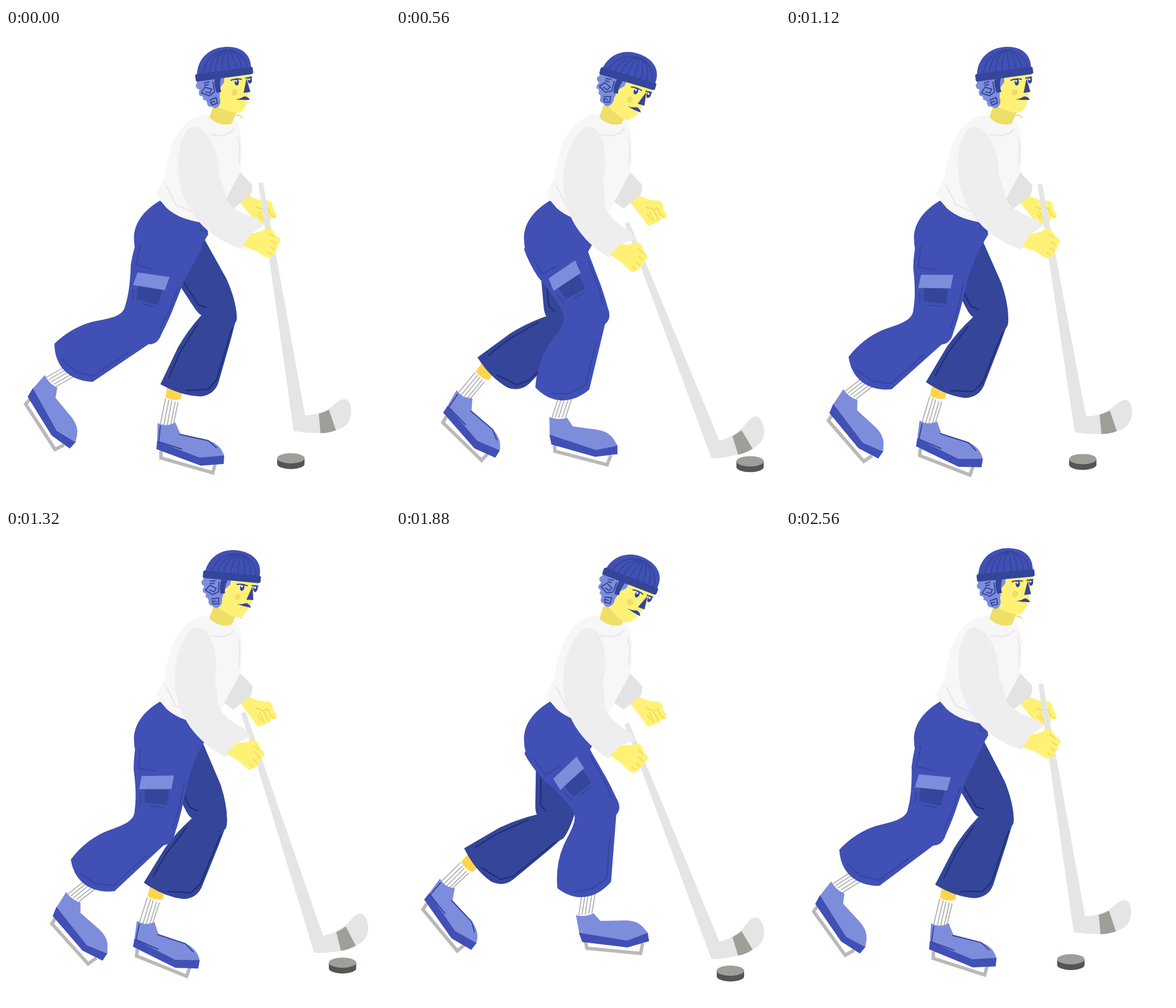
Animation, 674 px wide and 830 px high, one loop 2.6 s. Source, as an HTML page:

```html
<!DOCTYPE html>
<html lang="en">
<head>
<meta charset="utf-8">
<title>Hockey player</title>
<style>
html, body { margin: 0; width: 100%; height: 100%; overflow: hidden; background: #fff; }
svg { display: block; width: 100%; height: 100%; }
path { stroke-linejoin: round; }
.blue { fill: #4150b5; }
.navy { fill: #34459a; }
.sky { fill: #7e8ddb; }
.skin { fill: #fff176; }
.shade { fill: #eedf69; }
.amber { fill: #ffd54f; }
.shirt { fill: #f7f7f7; }
.sleeve { fill: #eee; }
.cuff { fill: #e3e3e3; }
.shaft { fill: #e5e5e5; }
.tape { fill: #9e9f99; }
.rubber { fill: #555; }
.white { fill: #fff; }
.line { fill: none; stroke-width: 2; }
.seam { stroke: #34459a; }
.deep { stroke: #1c2c6b; }
.fold { stroke: #e7e7e7; }
.knuckle { stroke: #eedc58; }
.rib { stroke: #b5b5b5; }
.blade { fill: none; stroke: #b9b9b9; stroke-width: 6; stroke-linejoin: miter; }
</style>
</head>
<body>
<svg viewBox="0 0 674 830">
  <g id="puck">
    <path class="rubber" d="M476 755V765A24 9 0 0 0 524 765V755Z"/>
    <ellipse class="tape" cx="500" cy="755" rx="24" ry="9"/>
  </g>

  <g id="farLeg">
    <path class="amber" d="M283 628L310 634L307 651Q293 655 280 648Z"/>
    <path class="white" d="M278 650L303 656L297 697L270 695Z"/>
    <path class="line rib" d="M280 650L271 695M286 652L277 697M291 654L283 697M297 656L289 697M302 657L294 695"/>
    <path class="blade" d="M272 742V754.500L363 780.500L367 765"/>
    <path class="sky" d="M266 693Q282 701 297 692L306 712L350 722Q377 729 383 751L340 756L265 728Z"/>
    <path class="blue" d="M265 725L340 754L383 750L382 765L342 768L264 739Z"/>
    <path class="line seam" d="M271 698L268 726L309 739M304 713L355 724L370 737"/>
    <path class="navy" d="M285 390L297 440L330 490Q337 501 343 504Q320 529 302 560L271 625Q308 646 343 646.500Q366 643 373 622L395 545L402 518Q406 514 405 504Q403 476 387 440L349 372L325 340Z"/>
    <path class="line deep" d="M303 432L338 486L352 490M336 520L305 570L286 613M397 526L370 617L355 634L315 636"/>
  </g>

  <path class="blue" d="M270 303C236 323 222 350 225 375Q225 386 229 392L265 410L331 403L355 362L350 335Z"/>

  <g id="nearLeg">
    <path class="white" d="M70 612L102 593L120 612L88 630Z"/>
    <path class="line rib" d="M71 613L104 594M75 617L108 598M79 621L112 602M84 625L116 607M88 629L120 611"/>
    <path class="blade" d="M43 650L34.500 660L86 739.500L102 731.500"/>
    <path class="sky" d="M68 609Q76 625 90 631L87 649L116 684Q127 699 125 713L122 728L90 711L46 634Z"/>
    <path class="blue" d="M47 632L38 647L80 715L112 738L122 727L89 707Z"/>
    <path class="blue" d="M234 362Q224 385 219 415Q218 460 209 488C205 509 174 510 150 516Q114 526 85 554C85 594 111 619 152 621L250 555Q266 556 273 537Q287 510 296 486L313 443L345 385L320 340Z"/>
    <path class="navy" d="M233 452L275 459L267 486L229 476Z"/>
    <path class="sky" d="M231 429L287 437L279 460L223 451Z"/>
    <path class="line seam" d="M237 379L228 415L258 424M224 459L222 478M238 484L260 489M303 454L285 500L269 529M97 580L121 602L152 611L217 568"/>
  </g>
  <path class="line seam" d="M341 346V354L354 357"/>

  <path class="skin" d="M411 306L427 294Q440 303 462 303Q469 307 469 318L475 327Q475 334 468 334Q464 332 464 338L445 347Q438 345 434 335Z"/>
  <path class="line knuckle" d="M438 314L452 319L460 316L464 327L473 333M452 320L461 337M445 322L453 340M441 326L447 336"/>
  <path class="cuff" d="M409 251L432 275Q433 285 429 293L399 317L380 303Z"/>

  <path class="shirt" d="M361 153C330 148 304 172 291 207Q281 238 277 266L263 291L271 303L282 316Q307 339 358 343L378 315L411 254Q415 225 414 200Q411 169 400 160Z"/>
  <path class="line fold" d="M357 187L380 189L394 184L401 176M407 191L410 207L409 240M281 276L298 310L325 322"/>
  <path class="shade" d="M364 136L357 157Q374 174 396 168L405 148L390 128Z"/>
  <path class="line" stroke="#eedc58" d="M404 153Q413 153 415 158"/>

  <g id="head">
    <path class="skin" d="M368 88L431 80L427 112Q424 139 413 147Q401 152 372 139Z"/>
    <path class="sky" d="M334 91Q337 97 333 100Q333 107 340 108Q337 114 340 119Q347 118 346 126Q353 126 353 133Q354 139 361 138Q369 144 374 136Q378 130 375 122L376 105L383 95V84Z"/>
    <path class="navy" d="M366 90L377 88Q374 102 378 112L370 114Q365 103 366 90Z"/>
    <path class="line seam" d="M347 97L357 94M348 101L356 99M363 94L366 112L357 119L343 114L349 104L361 107L358 114L350 112M357 127L369 122L371 132L362 135L359 130L367 129"/>
    <path class="blue" d="M335 84C335 53 358 33 389 33C417 33 431 50 430 72Z"/>
    <path class="line seam" d="M388 38Q350 45 346 81M388 38Q358 48 357 80M388 38Q366 50 368 79M388 38Q376 52 380 78M388 38Q389 55 393 76M390 38Q401 52 405 75M390 38Q412 48 415 74M390 38Q422 46 424 73"/>
    <path class="navy" d="M334 81L430 68Q433 68 433 71L434 78Q434 80 431 81L336 94Q333 94 333 91L332 84Q332 82 334 81Z"/>
    <circle class="shade" cx="401" cy="113" r="5.500"/>
    <path class="line seam" d="M394 92Q403 88 414 90M420 88L432 86"/>
    <ellipse class="navy" cx="405" cy="95" rx="3.800" ry="6"/>
    <ellipse class="navy" cx="428" cy="91.500" rx="3.800" ry="6"/>
    <circle class="white" cx="404" cy="93" r="1.800"/>
    <circle class="white" cx="427" cy="90" r="1.800"/>
    <path class="navy" d="M422 89L429 112L417 114Z"/>
    <path class="navy" d="M402 125Q410 125 416 121Q420 119 422 121Q425 121 428 126Q415 127 402 125Z"/>
  </g>

  <g id="stick">
    <path class="shaft" d="M443 272L451 271L525 680Q558 678 577 660Q590 649 598 652Q606 657 606 674Q605 699 579 706Q545 715 505 707Z"/>
    <path class="tape" d="M549 677Q559 674 567 670L579 706Q566 711 552 711Z"/>
  </g>

  <g id="arm">
    <path class="skin" d="M415 383L430 360Q446 360 459 350Q468 352 473 364Q482 367 482 374Q480 379 476 380Q480 387 473 390Q473 397 468 398L464 403Q456 403 451 399Q438 389 415 383Z"/>
    <path class="line knuckle" d="M462 361L473 367M466 373L476 380M464 384L473 390M459 393L467 398"/>
    <path class="sleeve" d="M302 240C302 201 315 173 331 173C352 173 369 207 374 245Q371 256 379 272Q385 290 386 299Q398 322 440 334L453 346L436 357Q421 368 415 388Q375 376 345 347Q302 302 302 240Z"/>
  </g>
</svg>
<script>
const LOOP = 2600, STEP = 40;
const part = id => document.getElementById(id);

// Straight-line interpolation; each key is [time, value, value...]
function track(keys, t) {
  const i = keys.findIndex(key => key[0] > t);
  const a = keys[i - 1], b = keys[i];
  const k = (t - a[0]) / (b[0] - a[0]);
  return a.slice(1).map((v, n) => v + (b[n + 1] - v) * k);
}

const stride = [[0, 0], [680, 1], [1200, 0], [1880, 1], [LOOP, 0]];
const nod = [[0, 0], [670, 1], [1120, 0], [1560, 1], [2125, 1], [LOOP, 0]];
const swing = [[0, 0], [440, 1], [680, 1], [1110, 0], [1400, 1], [2010, 1], [2340, 0], [LOOP, 0]];
const slide = [
  [0, 0, 0], [500, 136, 6], [1060, 0, 0], [1450, 136, 9], [1680, 111, 16],
  [1880, 87, 20], [2240, 35, 5], [2480, 0, 0], [LOOP, 0, 0]
];

function turn(id, angle, x, y, shift = "") {
  part(id).setAttribute("transform", `${shift} rotate(${angle} ${x} ${y})`);
}

function draw(now) {
  const t = Math.floor((now + 0.5) / STEP) * STEP % LOOP;
  const [step] = track(stride, t);
  const [tilt] = track(nod, t);
  const [push] = track(swing, t);
  const [x, y] = track(slide, t);

  turn("nearLeg", -51.6 * step, 263, 387);
  turn("farLeg", 34.4 * step, 300, 348);
  turn("head", 29.1 * tilt, 376.5, 140.5);
  turn("arm", 13.5 * push, 333, 218);
  turn("stick", -12.2 * push, 447, 271, `translate(${-42 * push} ${70 * push})`);
  part("puck").setAttribute("transform", `translate(${x} ${y})`);
  requestAnimationFrame(draw);
}
draw(0);
</script>
</body>
</html>
```
